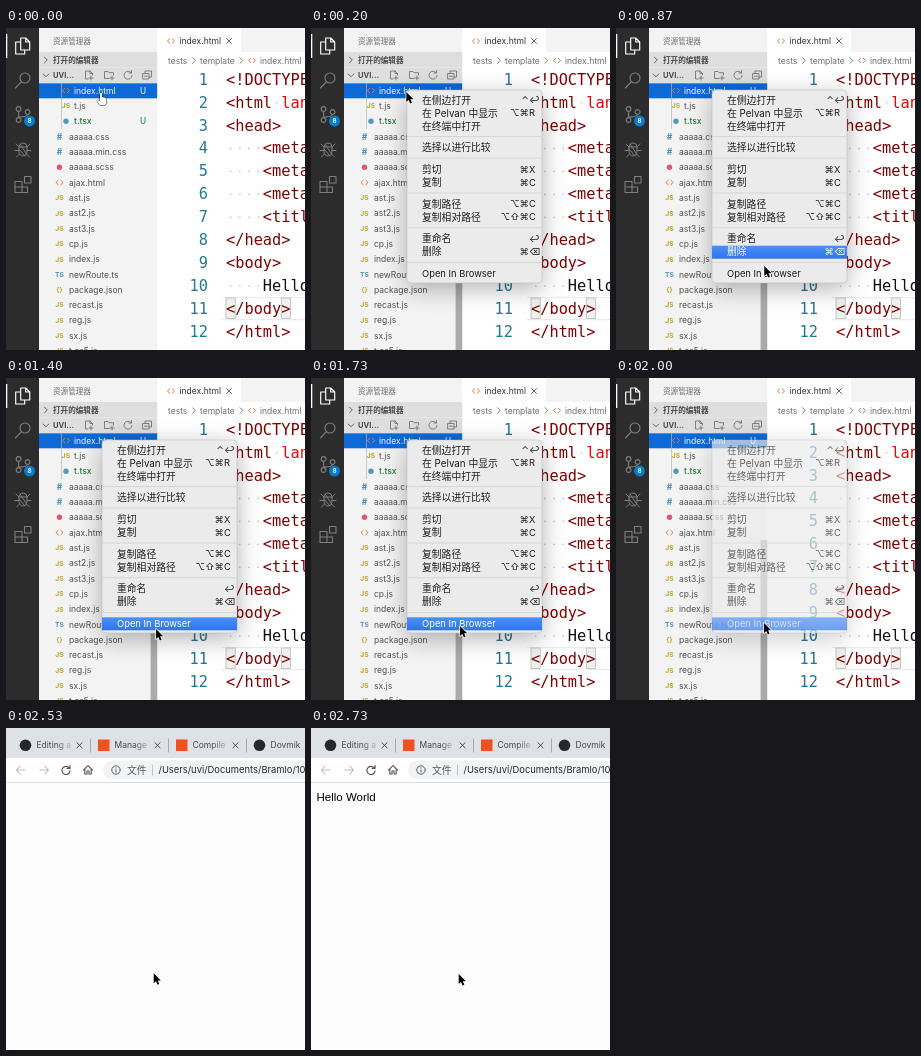
These frames come from a looping animation (299x322 px, 3.07 s). An HTML page with a canvas:

```html
<!DOCTYPE html>
<html lang="zh">
<head>
<meta charset="utf-8">
<title>Open In Browser</title>
<style>
html, body { margin: 0; width: 100%; height: 100%; overflow: hidden; background: #fff; }
canvas { display: block; width: 299px; height: 322px; }
</style>
</head>
<body>
<canvas id="stage"></canvas>
<script>
const W = 299, H = 322, LOOP = 3070, STEP = 200 / 3;
const UI = 'Inter, "Noto Sans CJK SC", "Noto Sans CJK JP", "DejaVu Sans", sans-serif';
const MONO = '"DejaVu Sans Mono", monospace';
const canvas = document.getElementById('stage');
const c = canvas.getContext('2d');
const dpr = Math.max(1, window.devicePixelRatio || 1);
canvas.width = W * dpr;
canvas.height = H * dpr;

function rect(x, y, w, h, color) {
  c.fillStyle = color;
  c.fillRect(x, y, w, h);
}

function disc(x, y, r, color) {
  c.beginPath();
  c.arc(x, y, r, 0, 7);
  c.fillStyle = color;
  c.fill();
}

// y is the vertical middle of the capitals
function text(s, x, y, size, color, { font = UI, weight = 400, align = 'left' } = {}) {
  c.font = `${weight} ${size}px ${font}`;
  c.textAlign = align;
  c.fillStyle = color;
  c.fillText(s, x, y + size * 0.36);
}

function stroke(d, x, y, color, width = 1) {
  c.save();
  c.translate(x, y);
  c.strokeStyle = color;
  c.lineWidth = width;
  c.lineJoin = c.lineCap = 'round';
  c.stroke(new Path2D(d));
  c.restore();
}

const cross = (x, y, r, color) => stroke(`M${-r} ${-r}L${r} ${r}M${r} ${-r}L${-r} ${r}`, x, y, color, 1);
const chevron = (x, y, color) => stroke('M-1.5 -2.8L1.3 0L-1.5 2.8', x, y, color, 0.9);
const angles = (x, y, color) => stroke('M-1.3 -2.2L-3.6 0L-1.3 2.2M1.3 -2.2L3.6 0L1.3 2.2', x, y, color, 1);

function activityBar() {
  rect(0, 0, 33, H, '#2c2c2c');
  rect(0, 6, 1.3, 24, '#fff');
  const dim = '#7f7f7f';
  stroke('M-2 -8H3L7 -4V4H-2ZM3 -8V-4H7M-2 -4H-7V8H2V4', 16.7, 18, '#fff', 1.15);
  stroke('M7 -2A5 5 0 1 1 -3 -2A5 5 0 1 1 7 -2M-1.6 1.6L-7.5 8', 17, 52, dim, 1.15);
  stroke('M-2 -5A2.4 2.4 0 1 1 -6.8 -5A2.4 2.4 0 1 1 -2 -5M-2 6A2.4 2.4 0 1 1 -6.8 6A2.4 2.4 0 1 1 -2 6' +
    'M7 -2A2.4 2.4 0 1 1 2.2 -2A2.4 2.4 0 1 1 7 -2M-4.4 -2.6V3.6M4.6 .4Q4 3 -4 3', 17, 86, dim, 1.1);
  disc(23.5, 93, 5.5, '#0a7acb');
  text('8', 23.5, 93, 6.5, '#fff', { weight: 600, align: 'center' });
  stroke('M-4 -2A4 4 0 0 1 4 -2V3A4 4 0 0 1 -4 3ZM-4 -2H4M-4 -2L-7 -5M4 -2L7 -5M-4 1.5H-8M4 1.5H8M-3.5 5L-6.5 8M3.5 5L6.5 8M-3 -5L3 4M-4 0L2 7',
    17, 121, dim, 1);
  stroke('M-8 -3H-1V8H-8ZM-8 2.5H4.5V8H-1M1.5 -8H8V-1.5H1.5Z', 17, 156.5, dim, 1.1);
}

const FILES = ['index.html', 't.js', 't.tsx', 'aaaaa.css', 'aaaaa.min.css', 'aaaaa.scss', 'ajax.html', 'ast.js',
  'ast2.js', 'ast3.js', 'cp.js', 'index.js', 'newRoute.ts', 'package.json', 'recast.js', 'reg.js', 'sx.js', 't.es5.js'];
const BADGES = { js: ['JS', '#b7a51f'], ts: ['TS', '#4b93b8'], css: ['#', '#4b93b8'], json: ['{}', '#b7a51f'] };

function fileIcon(name, x, y) {
  const ext = name.split('.').pop();
  if (ext === 'html') angles(x, y, '#e07a45');
  else if (ext === 'tsx') disc(x, y, 2.7, '#519aba');
  else if (ext === 'scss') disc(x, y, 2.7, '#e0586f');
  else {
    const [s, color] = BADGES[ext];
    text(s, x, y, ext === 'css' ? 8.5 : 6.7, color, { weight: 700, align: 'center' });
  }
}

function sidebar(k) {
  const focused = k < 35;
  const edge = 151.4, width = edge - 33;
  c.save();
  c.beginPath();
  c.rect(33, 0, width, H);
  c.clip();
  rect(33, 0, width, H, '#f3f3f3');
  text('资源管理器', 47, 13, 7.6, '#6f6f6f');
  rect(33, 24, width, 31, '#dedede');
  rect(33, 39.3, width, 0.6, '#ededed');
  chevron(40, 32, '#555');
  text('打开的编辑器', 47, 32, 7.6, '#4a4a4a', { weight: 700 });
  stroke('M-2.8 -1.5L0 1.3L2.8 -1.5', 40, 47.5, '#555', 0.9);
  text('UVI...', 47, 47.5, 7.6, '#4a4a4a', { weight: 700 });
  const ink = '#686868';
  stroke('M-1 4H-3.5V-4H1L3.5 -1.5V0M1 -4V-1.5H3.5M0 3H4M2 1V5', 83, 47, ink, 0.8);
  stroke('M0 3.5H-4.5V-3.5H-1L0 -2.3H4.5V0M1 3H5M3 1V5', 103, 47, ink, 0.8);
  stroke('M3.2 -2.2A4 4 0 1 0 4 .6M3.5 -4.5V-2H1', 122, 47, ink, 0.8);
  stroke('M-4 -1.5H2V4H-4ZM-2 -1.5V-4H4.5V2H2M-2.5 1.2H.5', 141, 47, ink, 0.8);

  rect(33, 55.3, width, 15, focused ? '#0c69d6' : '#dfe2ee');
  rect(55, 55, 0.7, 46, focused ? '#b5b5b5' : '#a5a5a5');
  FILES.forEach((name, i) => {
    const y = 62.6 + i * 15.32;
    const nested = i < 3;
    const fresh = i === 0 || i === 2;
    const white = i === 0 && focused;
    const color = white ? '#f4f8ff' : fresh ? '#22753a' : '#505050';
    fileIcon(name, nested ? 60 : 53.5, y);
    text(name, nested ? 68 : 63, y, 8.5, color, { weight: fresh && !white ? 500 : 400 });
    if (fresh) text('U', 137, y, 8.3, white ? '#d5e6f8' : '#3d8a4b', { weight: 500, align: 'center' });
  });
  if (k >= 3) rect(144.6, 162, 7, 160, k >= 33 ? 'rgba(100,100,100,.7)' : 'rgba(100,100,100,.5)');
  c.restore();
}

const MAROON = '#800000';
const CODE = ['<!DOCTYPE', '<html', '<head>', '    <meta', '    <meta', '    <meta', '    <title', '</head>',
  '<body>', '    Hello', '</body>', '</html>'];

function editor() {
  const size = 15.3, cell = size * 0.602, left = 220;
  rect(151, 0, 148, H, '#fff');
  rect(235, 0, 64, 24, '#f3f3f3');
  angles(165, 13, '#e07a45');
  text('index.html', 173.5, 13, 8.5, '#303030');
  cross(223, 13, 2.5, '#666');
  const grey = '#6c6c6c';
  text('tests', 162, 32.5, 8.5, grey);
  chevron(188, 32.5, grey);
  text('template', 194, 32.5, 8.5, grey);
  chevron(235.5, 32.5, grey);
  angles(246, 32.5, '#e07a45');
  text('index.html', 254, 32.5, 8.5, grey);

  const lineY = i => 51.2 + i * 22.93;
  const current = lineY(10);
  rect(216, current - 11.5, 83, 1.2, '#ebebeb');
  rect(216, current + 10.5, 83, 1.2, '#ebebeb');
  c.lineWidth = 0.8;
  c.strokeStyle = '#b9b9b9';
  for (const col of [0, 6]) {
    rect(left + col * cell, current - 10.5, cell, 20.5, '#eef2ec');
    c.strokeRect(left + col * cell, current - 10.5, cell, 20.5);
  }
  const mono = { font: MONO };
  CODE.forEach((line, i) => {
    const y = lineY(i);
    text(String(i + 1), 202, y, size, '#237893', { font: MONO, align: 'right' });
    const body = line.trimStart();
    const indent = line.length - body.length;
    for (let n = 0; n < indent; n++) disc(left + (n + 0.5) * cell, y + 0.5, 0.9, '#c9c9c9');
    text(body, left + indent * cell, y, size, body === 'Hello' ? '#111' : MAROON, mono);
  });
  disc(left + 5.5 * cell, lineY(1) + 0.5, 0.9, '#c9c9c9');
  text('lang', left + 6 * cell, lineY(1), size, '#f00000', mono);
}

// label, middle y, modifiers, key
const ITEMS = [
  ['在侧边打开', 72, '⌃', '↩'],
  ['在 Pelvan 中显示', 85, '⌥⌘', 'R'],
  ['在终端中打开', 98, '', ''],
  ['选择以进行比较', 119, '', ''],
  ['剪切', 141.3, '⌘', 'X'],
  ['复制', 154.3, '⌘', 'C'],
  ['复制路径', 176, '⌥⌘', 'C'],
  ['复制相对路径', 189, '⌥⇧⌘', 'C'],
  ['重命名', 210.7, '', '↩'],
  ['删除', 223.7, '⌘', '⌫'],
  ['Open In Browser', 245.3, '', '']
];

function menu(alpha, hot) {
  const box = new Path2D();
  box.roundRect(96, 62, 135, 193, 4);
  const outside = new Path2D(box);
  outside.rect(0, 0, W, H);
  c.save();
  c.globalAlpha = alpha;

  // shadow stays outside the box so that the fading panel keeps its tint
  c.save();
  c.clip(outside, 'evenodd');
  c.shadowColor = 'rgba(0,0,0,.3)';
  c.shadowBlur = 24 * dpr;
  c.shadowOffsetY = 6 * dpr;
  c.fillStyle = '#ebebeb';
  c.fill(box);
  c.restore();

  c.fillStyle = '#ebebeb';
  c.fill(box);
  c.lineWidth = 0.5;
  c.strokeStyle = '#b4b4b4';
  c.stroke(box);
  for (const y of [108.5, 130, 165, 199.7, 234.5]) rect(96, y - 0.5, 135, 1, '#d6d6d6');
  ITEMS.forEach(([label, y, mods, key], i) => {
    const on = i === hot;
    if (on) {
      const blue = c.createLinearGradient(0, y - 6, 0, y + 7);
      blue.addColorStop(0, '#4b91f7');
      blue.addColorStop(1, '#2f74ee');
      rect(96, y - 6, 135, 13, blue);
    }
    const color = on ? '#fff' : '#1c1c1c';
    text(label, 111, y, label.startsWith('Open') ? 9.4 : 9.8, color);
    text(mods, 217.8, y, 9.3, color, { align: 'right' });
    text(key, 218, y, 9.3, color);
  });
  c.restore();
}

function hotItem(y) {
  let hot = -1;
  ITEMS.forEach((item, i) => { if (y >= item[1] - 6.5) hot = i; });
  return hot;
}

function browser(loaded) {
  rect(0, 0, W, H, '#fefdfe');
  rect(0, 0, W, 30, '#dee1e6');
  [['Editing a', '#24292e'], ['Manage', '#f25022'], ['Compile', '#f25022'], ['Dovmik', '#24292e']].forEach(([label, color], i) => {
    const x = i * 78;
    if (i % 3) rect(x + 14, 11.5, 11.5, 11.5, color);
    else disc(x + 19.5, 17.3, 5.8, color);
    const fade = c.createLinearGradient(x + 50, 0, x + 67, 0);
    fade.addColorStop(0, '#45494d');
    fade.addColorStop(1, i === 3 ? '#45494d' : 'rgba(69,73,77,.15)');
    text(label, x + 30.5, 17.3, 8.5, fade);
    cross(x + 73.5, 17.3, 2.6, '#4a4d51');
    rect(x + 84, 10.5, 0.8, 14, '#979ba1');
  });
  rect(0, 30, W, 24, '#fff');
  stroke('M4 0H-4.5M-.8 -4L-4.5 0L-.8 4', 15, 42, '#b9bbbe', 1.1);
  stroke('M-4 0H4.5M.8 -4L4.5 0L.8 4', 38, 42, '#b9bbbe', 1.1);
  stroke('M3.2 -2.2A4.1 4.1 0 1 0 4.1 .8M4 -4.4V-1.6H1.2', 60, 42, '#50545a', 1.2);
  stroke('M-4.7 .2L0 -4.4L4.7 .2M-3.2 -.8V4H-1V1H1V4H3.2V-.8', 82, 42, '#50545a', 1.1);
  c.beginPath();
  c.roundRect(97, 32.5, 220, 19, 9.5);
  c.fillStyle = '#f1f3f4';
  c.fill();
  stroke('M4.2 0A4.2 4.2 0 1 1 -4.2 0A4.2 4.2 0 1 1 4.2 0M0 -.3V2M0 -2V-1.9', 110, 42, '#5f6368', 1);
  text('文件', 121, 42, 9.8, '#55595e');
  rect(146, 36.5, 0.8, 11, '#b5b8bc');
  text('/Users/uvi/Documents/Bramlo/10', 152.5, 42, 9.4, '#27292c');
  rect(0, 54, W, 0.8, '#d5d7da');
  if (loaded) text('Hello World', 5.5, 68.7, 11.5, '#000', { font: '"Liberation Sans", sans-serif' });
}

// step, x, y of the pointer tip
const PATH = [[0, 95, 65], [3, 95.3, 64], [8, 95.3, 64], [13, 148.3, 238], [16, 151, 249], [21, 150, 251],
  [26, 149, 248], [30, 148, 245], [36, 147.7, 245], [41, 147.7, 246]];

function pointerAt(k) {
  for (let i = 1; i < PATH.length; i++) {
    const [k0, x0, y0] = PATH[i - 1], [k1, x1, y1] = PATH[i];
    if (k <= k1) {
      const p = (k - k0) / (k1 - k0), e = p * p * (3 - 2 * p);
      return [x0 + (x1 - x0) * e, y0 + (y1 - y0) * e];
    }
  }
  return PATH[PATH.length - 1].slice(1);
}

const ARROW = 'M0 0V10L2.3 7.9L3.9 11.4L5.6 10.7L4.1 7.2H7.2Z';
const HAND = 'M-1 1Q-1 -.3 0 -.3Q1 -.3 1 1V4.2Q2 3.6 2.7 4.6Q3.8 4.1 4.3 5.2Q5.5 5 5.5 6.4V8.5L4.4 12H-1.4L-4 7.8Q-3.6 6.2 -1 8Z';

function pointer(x, y, hand) {
  const shape = new Path2D(hand ? HAND : ARROW);
  c.save();
  c.translate(x, y);
  c.lineJoin = 'round';
  c.lineWidth = hand ? 0.9 : 1.4;
  c.strokeStyle = hand ? '#000' : '#fff';
  c.fillStyle = hand ? '#fff' : '#000';
  c.stroke(shape);
  c.fill(shape);
  c.restore();
}

function draw(k) {
  c.setTransform(dpr, 0, 0, dpr, 0, 0);
  const [x, y] = pointerAt(k);
  if (k >= 38) browser(k >= 41);
  else {
    editor();
    sidebar(k);
    activityBar();
    const alpha = Math.min(1, Math.max(0, (32 - k) / 3));
    if (k >= 3 && k < 32) menu(alpha, k < 8 ? -1 : hotItem(y));
  }
  pointer(x, y, k < 3);
}

const start = performance.now();
function tick() {
  const t = (performance.now() - start) % LOOP;
  draw(Math.min(41, Math.floor((t + 4) / STEP)));
  requestAnimationFrame(tick);
}
tick();
</script>
</body>
</html>
```
